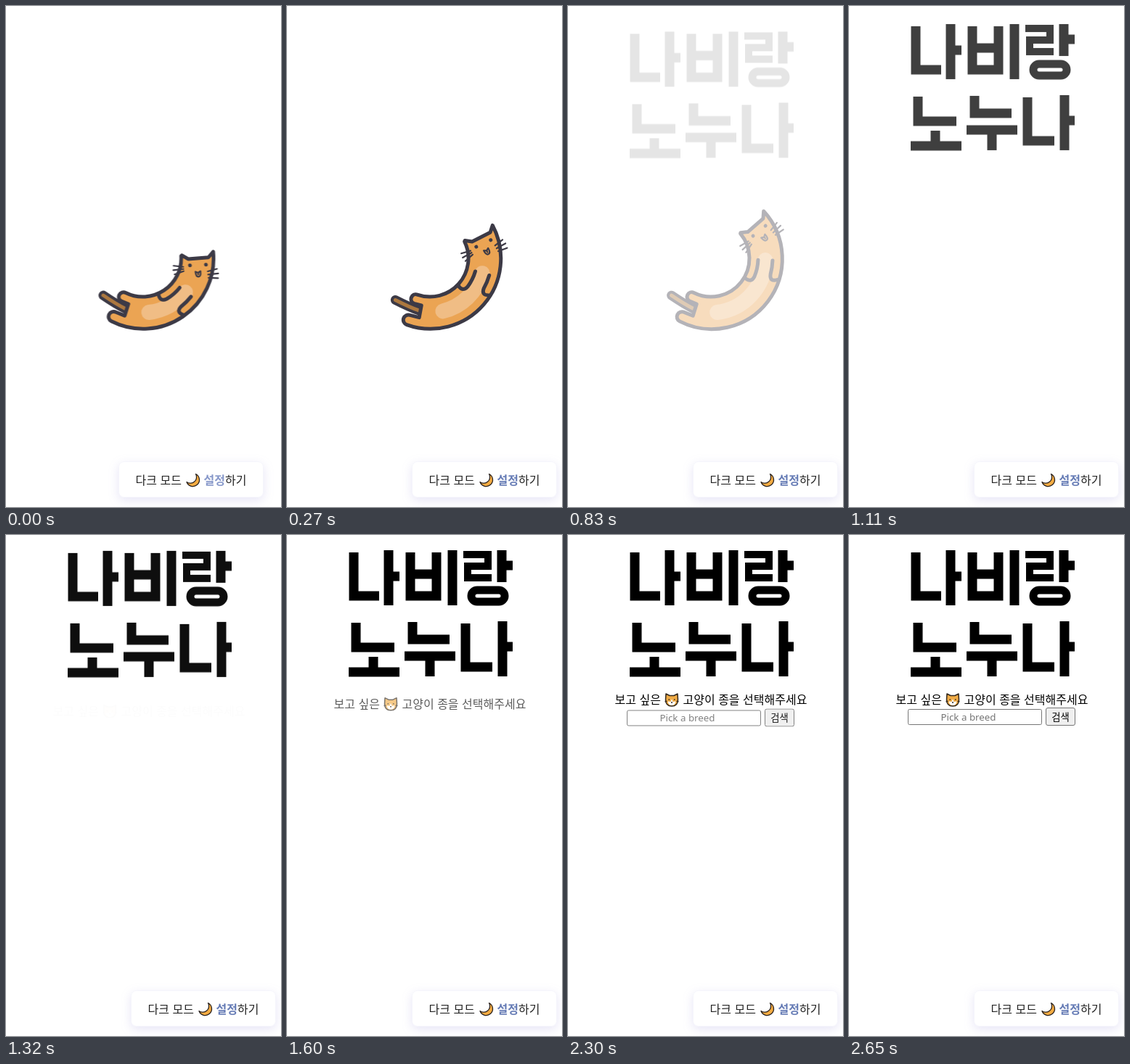
Recreate the animation shown at these times as an HTML page. Size 379x691 px, loop 3.44 s.

```html
<!DOCTYPE html>
<html lang="ko">
<head>
<meta charset="utf-8">
<title>나비랑 노누나</title>
<style>
  html, body { margin: 0; width: 100%; height: 100%; overflow: hidden; background: #fff; }
  svg { display: block; }
  text { font: 16px "Noto Sans CJK KR", "Noto Sans CJK", "Noto Sans KR", sans-serif; }
  .panel { fill: #fff; stroke: #f5f5fb; filter: drop-shadow(0 4px 7px rgba(110, 100, 200, .17)); }
  #mode { fill: #222; }
  .bold { font-weight: 700; }
  .small { font-size: 13.333px; text-anchor: middle; }
  .hint { font-family: "Noto Sans", sans-serif; fill: #757575; }
  .line { fill: none; stroke: #3c3a46; stroke-width: 5; stroke-linecap: round; stroke-linejoin: round; }
  .thin { stroke-width: 2.2; }
  #body { fill: #eba453; }
  #shine { fill: none; stroke: #f0bd85; stroke-width: 21; stroke-linecap: round; }
  #title { fill: none; stroke: #000; stroke-width: 13; }
</style>
</head>
<body>
<svg width="379" height="691" viewBox="0 0 379 691">
  <g id="cat">
    <g id="tail">
      <path class="line" style="stroke-width:13" d="M73 -10Q73 4 70 26"/>
      <path class="line" style="stroke:#ac783f" d="M73 -10Q73 4 70 26"/>
    </g>
    <path id="body" class="line"/>
    <path id="shine"/>
    <g id="head">
      <path id="paws" class="line"/>
      <circle cx="63.5" cy="17" r="2.5" fill="#3c3a46"/>
      <circle cx="85.5" cy="18.5" r="2.5" fill="#3c3a46"/>
      <path class="line thin" d="M70 26.5l3.5 2 3.5-2M70 27q0 7 3.5 7t3.5-7M73.5 29v2"/>
      <path class="line thin" d="M41 15l13 3M40 21h14M41 27l13-3M87 28l13-2M87 32.500h14M87 37l13 2"/>
    </g>
  </g>

  <g id="title" role="img" aria-label="나비랑 노누나">
    <path d="M92 24V84H127M140 21V97M140 57H155"/>
    <path d="M170 24V84H206V24M170 54H206M228 21V97"/>
    <path stroke-width="10" d="M243 27H277V43H249V59H282"/>
    <path d="M296 21V65M296 42H311"/>
    <rect x="254" y="76" width="46" height="16" rx="8" stroke-width="11"/>
    <path d="M95 121V155H148M119 168V189M85 189H155"/>
    <path d="M173 120V144H224M162 167H232M197 167V195"/>
    <path d="M246 122V182H283M297 119V195M297 154H311"/>
  </g>

  <g id="subtitle">
    <text x="64.500" y="233">보고 싶은</text>
    <g stroke="#33291f" stroke-width="1.5" stroke-linejoin="round">
      <path fill="#f0ab45" d="M135 219l5 2.500h6l5-2.500 .5 8q0 9-8.500 9t-8.500-9z"/>
      <path fill="#fff" stroke="none" d="M143 226l1.500 4 4-.5q-1 5.500-5.500 5.500t-5.500-5.500l4 .5z"/>
      <path fill="none" d="M138.500 227h1.500M146 227h1.500M142 231h2M133.500 229.500h3M152.500 229.500h-3"/>
    </g>
    <text x="158.500" y="233">고양이 종을 선택해주세요</text>
  </g>

  <g id="form">
    <rect x="81.500" y="240.500" width="184" height="21" rx="2" fill="#fff" stroke="#767676"/>
    <text class="small hint" x="164.500" y="256">Pick a breed</text>
    <rect x="271.500" y="238.500" width="40" height="24" rx="2.500" fill="#efefef" stroke="#767676"/>
    <text class="small" x="291.500" y="256">검색</text>
  </g>

  <g id="mode">
    <rect class="panel" x="172.500" y="628.500" width="199" height="49" rx="7"/>
    <text x="195.500" y="660">다크 모드</text>
    <path d="M278.500 645.500A9 9 0 1 1 266 656.500A8.500 8.500 0 0 0 278.500 645.500Z"
      fill="#f5ac42" stroke="#2b2320" stroke-width="1.300" stroke-linejoin="round"/>
    <text id="accent" class="bold" x="289.500" y="660">설정</text>
    <text x="319" y="660">하기</text>
  </g>
</svg>
<script>
const LOOP = 3440, STEP = 70, SCROLLBAR_GONE = 200;
const $ = id => document.getElementById(id);
const set = (id, name, value) => $(id).setAttribute(name, value);

// Polar point, counter-clockwise degrees from the right.
const at = (r, deg) => {
  const a = deg * Math.PI / 180;
  return `${(r * Math.cos(a)).toFixed(2)} ${(-r * Math.sin(a)).toFixed(2)}`;
};
const arc = (r, from, to) =>
  `A${r} ${r} 0 ${+(Math.abs(to - from) > 180)} ${+(to < from)} ${at(r, to)}`;
const local = (x, y, turn) =>
  at(Math.hypot(x, y), turn - Math.atan2(y, x) * 180 / Math.PI);

const bodyPath = (head, tail) => {
  const ears = [[54, 2], [62, 8], [90, 9], [97.5, 2]].map(([x, y]) => local(x, y, head));
  return `M${ears.join('L')}${arc(97, head - 2, tail)}A7 7 0 0 1 ${at(83, tail)}` +
    `L${at(83, tail + 9)}L${at(66, tail + 9)}L${at(66, tail)}` +
    `A6.5 6.5 0 0 1 ${at(53, tail)}${arc(53, tail, head - 3)}Z`;
};

set('paws', 'd',
  `M${at(65, -45)}${arc(65, -45, -66)}Q${at(65, -75)} ${at(54, -73)}` +
  `M${at(85, -45)}${arc(85, -45, -58)}Q${at(87, -65)} ${at(96, -61)}`);

const drawCat = (ms, shift) => {
  const t = Math.min(ms, 925) / 550;
  const head = 6.5 + 138.5 * t ** 2.556;
  const tail = -116.5 + 86 * t ** 3.48;
  set('cat', 'transform', `translate(${197 - shift / 2} 348)`);
  set('head', 'transform', `rotate(${-head})`);
  set('tail', 'transform', `rotate(${-tail})`);
  set('body', 'd', bodyPath(head, tail));
  set('shine', 'd', `M${at(75, head - 45)}${arc(75, head - 45, tail + 33)}`);
};

const rise = [
  { opacity: 0, transform: 'translateY(16px)' },
  { opacity: 1, transform: 'translateY(0)' }
];
const fades = [
  ['cat', { opacity: [1, 0] }, 680, 245, 'linear'],
  ['title', rise, 745, 800, 'ease'],
  ['subtitle', rise, 1300, 800, 'ease'],
  ['form', rise, 1790, 800, 'ease']
].map(([id, keys, delay, duration, easing]) => {
  const fade = $(id).animate(keys, { delay, duration, easing, fill: 'both' });
  fade.pause();
  return fade;
});

const snap = t => t < 70 ? 0 : t < 130 ? 70 : 550 + Math.floor((t - 550) / STEP) * STEP;

const start = performance.now();
const draw = now => {
  const t = snap(Math.max(0, now - start) % LOOP);
  const shift = t < SCROLLBAR_GONE ? 17 : 0;
  drawCat(t, shift);
  set('mode', 'transform', `translate(${-shift} 0)`);
  set('accent', 'fill', shift ? '#8798ca' : '#657bb5');
  for (const fade of fades) fade.currentTime = t;
  requestAnimationFrame(draw);
};
draw(start);
</script>
</body>
</html>
```
